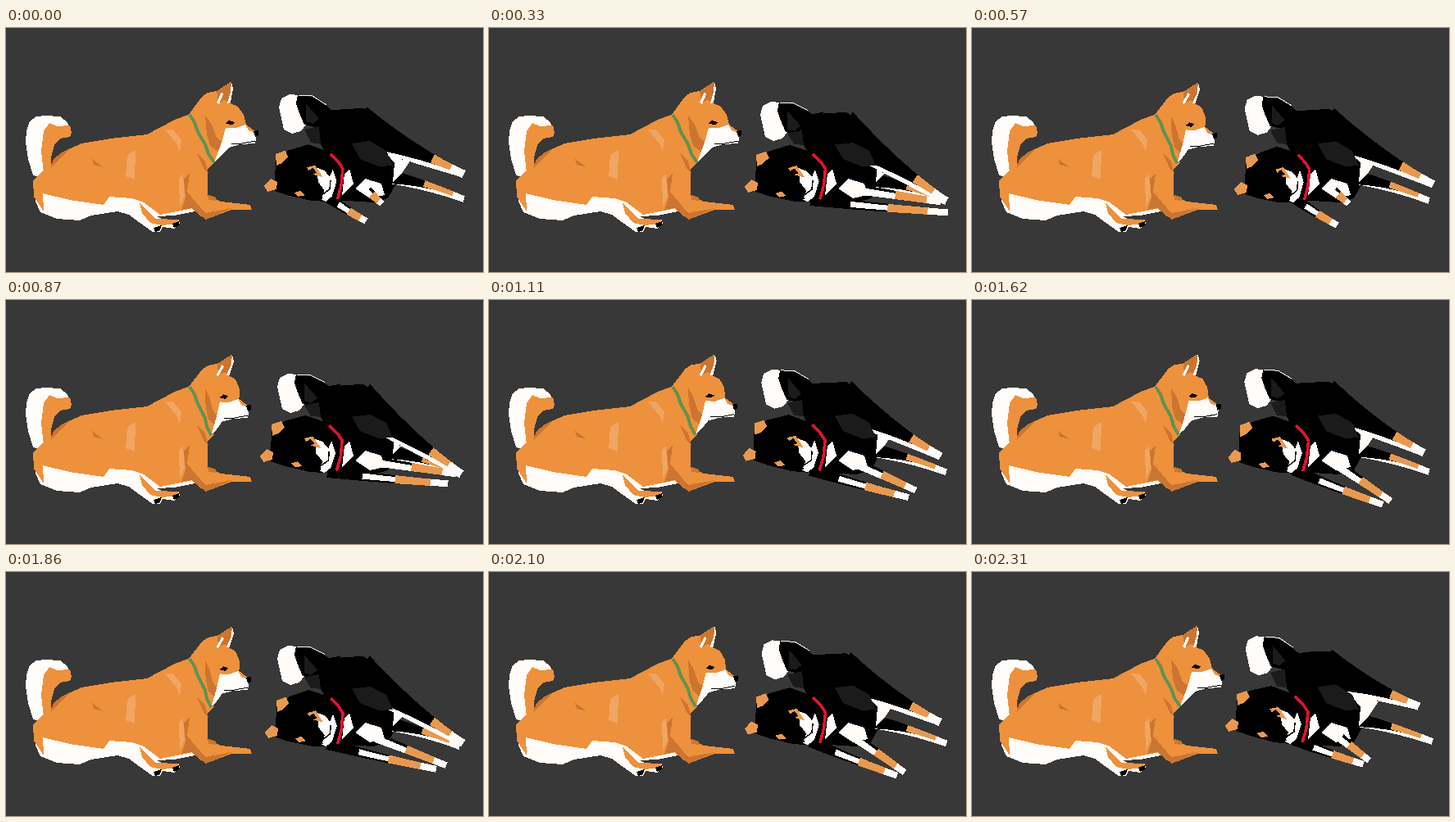
Recreate the animation shown at these times as an HTML page. Size 582 by 298 pixels, loop 2.34 s.

```html
<!DOCTYPE html>
<html lang="en">
<head>
<meta charset="utf-8">
<title>Two dogs</title>
<style>
html, body { margin: 0; width: 100%; height: 100%; overflow: hidden; background: #383838; }
svg { display: block; width: 100vw; height: 100vh; }
</style>
</head>
<body>
<svg id="stage" viewBox="0 0 582 298" shape-rendering="crispEdges"></svg>
<script>
const LOOP = 2340, STEPS = 58;
const ORANGE = '#ee913c', RUST = '#cb7530', PEACH = '#f0a563', WHITE = '#fffcfa',
      GREEN = '#5f9350', BLACK = '#000', COAL = '#1b1b1b', RED = '#e2132f', TAN = '#e9994f';

const stage = document.getElementById('stage');
const moving = [];
const clamp = v => Math.min(1, Math.max(0, v));
const mix = (a, b, k) => a + (b - a) * k;

// Each pose: head turn of the orange dog, rump drop, head offset, four paw positions
const pose = (turn, rump, nod, up, low, near, far) => [turn, rump, ...nod, ...up, ...low, ...near, ...far];
const TUCK = pose(0, 0, [6, 5], [555, 177], [556, 208], [438, 235], [458, 214]);
const SPREAD = pose(0, -.3, [0, 0], [542, 163], [559, 206], [475, 234], [483, 229]);
const KEYS = [
  [0, TUCK],
  [8, pose(0, 1, [3, 6], [554, 209], [555, 211], [555, 225], [548, 212])],
  [14, pose(1, .2, [11, 9], [559, 189], [555, 210], [444, 240], [459, 214])],
  [21, pose(1, 1, [1, 3], [552, 210], [552, 212], [535, 224], [546, 212])],
  [34, SPREAD],
  [46, pose(1, 1, [7, 8], [554, 207], [551, 212], [521, 240], [534, 235])],
  [57, SPREAD],
  [58, TUCK]
];

function poseAt(step) {
  const i = KEYS.findIndex(([s]) => s > step) - 1;
  const [s0, a] = KEYS[i], [s1, b] = KEYS[i + 1];
  const u = (step - s0) / (s1 - s0), k = u * u * (3 - 2 * u);
  const [turn, rump, nx, ny, ux, uy, lx, ly, fx, fy, gx, gy] = a.map((v, j) => mix(v, b[j], k));
  const dip = x => 12 * Math.sin(Math.PI * k) * clamp((x - 420) / 80);
  return { turn, rump, nod: [nx, ny], up: [ux, uy], low: [lx, ly],
           near: [fx, fy + dip(fx)], far: [gx, gy + dip(gx)] };
}

function add(color, line) {
  const el = document.createElementNS('http://www.w3.org/2000/svg', line ? 'polyline' : 'polygon');
  el.setAttribute('fill', line ? 'none' : color);
  if (line) {
    el.setAttribute('stroke', color);
    el.setAttribute('stroke-width', line);
  }
  return stage.appendChild(el);
}
const place = (el, pts) => el.setAttribute('points', pts.map(p => p.map(v => v.toFixed(1))).join(' '));

// A flat shape; move(x, y, pose) bends its points
function shape(color, text, move, line) {
  const el = add(color, line), pts = text.split(' ').map(p => p.split(',').map(Number));
  place(el, pts);
  if (move) moving.push(p => place(el, pts.map(([x, y]) => move(x, y, p))));
}

// A tapered, slightly bent leg from root to paw, painted in bands.
// band: colour, start, end, upper side at start and end, lower side (-1 top edge, 1 bottom edge)
function leg(name, [rx, ry], wide, thin, bend, bands) {
  for (const [color, t0, t1, a0 = -1, a1 = -1, low = 1] of bands) {
    const el = add(color);
    moving.push(p => {
      const [px, py] = p[name], y0 = ry + 4 * p.rump;
      const len = Math.hypot(px - rx, py - y0), nx = (y0 - py) / len, ny = (px - rx) / len;
      const at = (t, side) => {
        const half = mix(thin, wide, Math.pow(clamp(1 - t), 1.3)) * side;
        const off = half + 4 * bend * t * (1 - t);
        return [mix(rx, px, t) + nx * off, mix(y0, py, t) + ny * off];
      };
      const top = [], bottom = [];
      for (let i = 0; i <= 5; i++) {
        const t = mix(t0, t1, i / 5);
        top.push(at(t, mix(a0, a1, i / 5)));
        bottom.unshift(at(t, low));
      }
      place(el, top.concat(bottom));
    });
  }
}

// Orange dog, body
shape(WHITE, '25,125 29,114 37,108 48,107 66,108 75,115 77,121 58,122 46,130 47,160 50,185 33,180 27,160 24,140');
shape(WHITE, '40,190 160,200 229,219 231,224 205,229 184,230 196,236 211,234 212,239 205,245 191,243 188,249 179,249 162,237 150,228 136,224 104,229 90,235 62,233 42,225 36,212');
shape(ORANGE, '46,126 53,116 62,120 78,119 80,128 78,133 66,135 59,143 55,158 56,174 46,178 43,150');
shape(ORANGE, '55,170 66,153 92,141 128,135 172,130 206,112 222,106 232,112 254,165 246,172 246,205 262,212 298,216 300,222 275,222 246,233 236,229 228,220 188,228 168,213 154,208 126,206 119,216 78,210 45,202 46,224 34,206 33,186 47,172');
shape(RUST, '54,172 58,160 68,152 80,146 66,159');
shape(RUST, '105,160 119,170 107,167');
shape(PEACH, '148,155 158,149 157,185 146,181');
shape(PEACH, '194,124 204,124 214,137 212,151 208,141');
shape(PEACH, '211,183 216,178 218,205 212,219');
shape(RUST, '232,151 243,163 247,178 241,171');
shape(RUST, '217,184 224,178 221,200 243,226 276,220 244,234 226,220 214,222 219,208');
shape(RUST, '247,204 256,207 257,211 247,210');
shape(ORANGE, '163,214 172,222 182,233 211,234 209,239 190,241 176,238 166,226');
shape(BLACK, '180,244 190,241 188,247 182,249');
shape(BLACK, '203,239 211,236 211,241 205,244');

// Orange dog, head: the muzzle swings back as the head turns
const turn = (x, y, p) => {
  const k = p.turn * clamp((x - 240) / 35) * clamp((y - 85) / 35);
  return [x - 9 * k + p.turn * clamp((95 - y) / 20), y + 3 * k + p.turn * clamp((95 - y) / 20)];
};
shape(ORANGE, '222,107 239,84 246,79 257,77 274,66 276,75 274,92 283,96 290,106 293,118 305,127 301,139 278,141 266,147 255,164 240,140', turn);
shape(RUST, '257,77 275,66 273,90 266,88 260,92', turn);
shape(WHITE, '275,66 277,74 274,91 270,92 274,78', turn);
shape(WHITE, '263,78 265,81 260,93 257,91', turn);
shape(RUST, '243,107 251,118 257,134 264,139 259,151 249,144 245,130', turn);
shape(WHITE, '268,122 281,122 292,118 296,125 306,129 304,141 286,142 272,146 262,157 254,164 263,140', turn);
shape(BLACK, '275,141 288,141 304,138', turn, 1);
shape(BLACK, '302,126 308,125 308,131 304,133', turn);
shape(BLACK, '267,117 272,113 279,115 276,118', turn);
shape(GREEN, '224,106 230,115 234,127 243,142 247,154 254,164', turn, 4);

// Black dog, tail and torso sink with the rump
const tail = (x, y, p) => [x - 2 * p.rump, y + 9 * p.rump * clamp((420 - x) / 40)];
const back = (x, y, p) => [x, y + 5 * p.rump * clamp((150 - y) / 30)];
shape(WHITE, '333,97 336,86 346,81 357,82 354,92 360,104 367,117 360,126 349,129 339,124', tail);
shape(BLACK, '356,82 374,84 390,94 396,100 410,100 400,125 384,123 364,118 358,104 354,92', tail);
shape(WHITE, '357,82 374,83 391,94', tail, 1);
shape(COAL, '366,92 382,111 374,117 366,114', tail);
shape(COAL, '364,124 382,120 385,142 372,140', back);
shape(BLACK, '382,121 396,101 412,99 436,98 452,107 470,140 476,165 476,190 466,208 448,213 400,210 394,160 384,142', back);

// Hind legs
leg('low', [462, 180], 9, 4, -2, [
  [BLACK, 0, .7], [WHITE, .1, 1, 1, -.2], [TAN, .5, .9, -1, -1, .3], [WHITE, .88, 1.03]
]);
shape(WHITE, '460,148 496,158 484,176 472,188 474,165', back);
leg('up', [430, 118], 24, 5, 2.5, [
  [BLACK, 0, .85], [WHITE, .15, .95, 1, .1], [TAN, .72, .93, -1, -1, .3], [WHITE, .9, 1.03]
]);
shape(COAL, '422,141 444,138 464,150 472,168 455,169 432,160', back);

// Chest and front legs
shape(WHITE, '413,178 419,172 424,190 410,204');
shape(WHITE, '426,196 438,184 458,190 462,204 444,208');
leg('far', [432, 190], 7, 4, 0, [
  [BLACK, .35, .8], [WHITE, .2, .7, -.4, -.4], [TAN, .55, .92], [WHITE, .88, 1.03]
]);
leg('near', [392, 206], 7, 4, 1, [
  [BLACK, 0, .8], [WHITE, .3, .8, -.6, -.6, .6], [TAN, .58, .92], [WHITE, .88, 1.03]
]);

// Black dog, head pivots at the neck
const nod = (x, y, p) => {
  const k = clamp((425 - x) / 95);
  return [x + p.nod[0] * k, y + p.nod[1] * k];
};
shape(BLACK, '322,180 323,158 339,145 365,139 394,150 408,162 412,178 405,206 388,210 369,208 339,200 322,194', nod);
shape(TAN, '323,149 335,145 339,153 331,160 324,163', nod);
shape(TAN, '309,188 317,179 325,183 324,192 313,195', nod);
shape(WHITE, '376,168 386,172 393,180 397,171 402,186 396,204 388,210 382,207 386,196 378,186', nod);
shape(TAN, '363,167 374,165 384,180 368,175', nod);
shape(BLACK, '364,172 371,168 376,174 368,177', nod);
shape(TAN, '347,197 355,195 361,201 352,202', nod);
shape(BLACK, '394,184 393,195 381,203', nod, 1.5);
shape(BLACK, '372,202 380,199 384,206 377,208', nod);
shape(RED, '394,152 404,162 410,171 408,191 403,208', nod, 3.5);

const start = performance.now();
function tick() {
  const t = (performance.now() - start) % LOOP;
  const now = poseAt(Math.floor(t / LOOP * STEPS));
  moving.forEach(move => move(now));
  requestAnimationFrame(tick);
}
tick();
</script>
</body>
</html>
```
